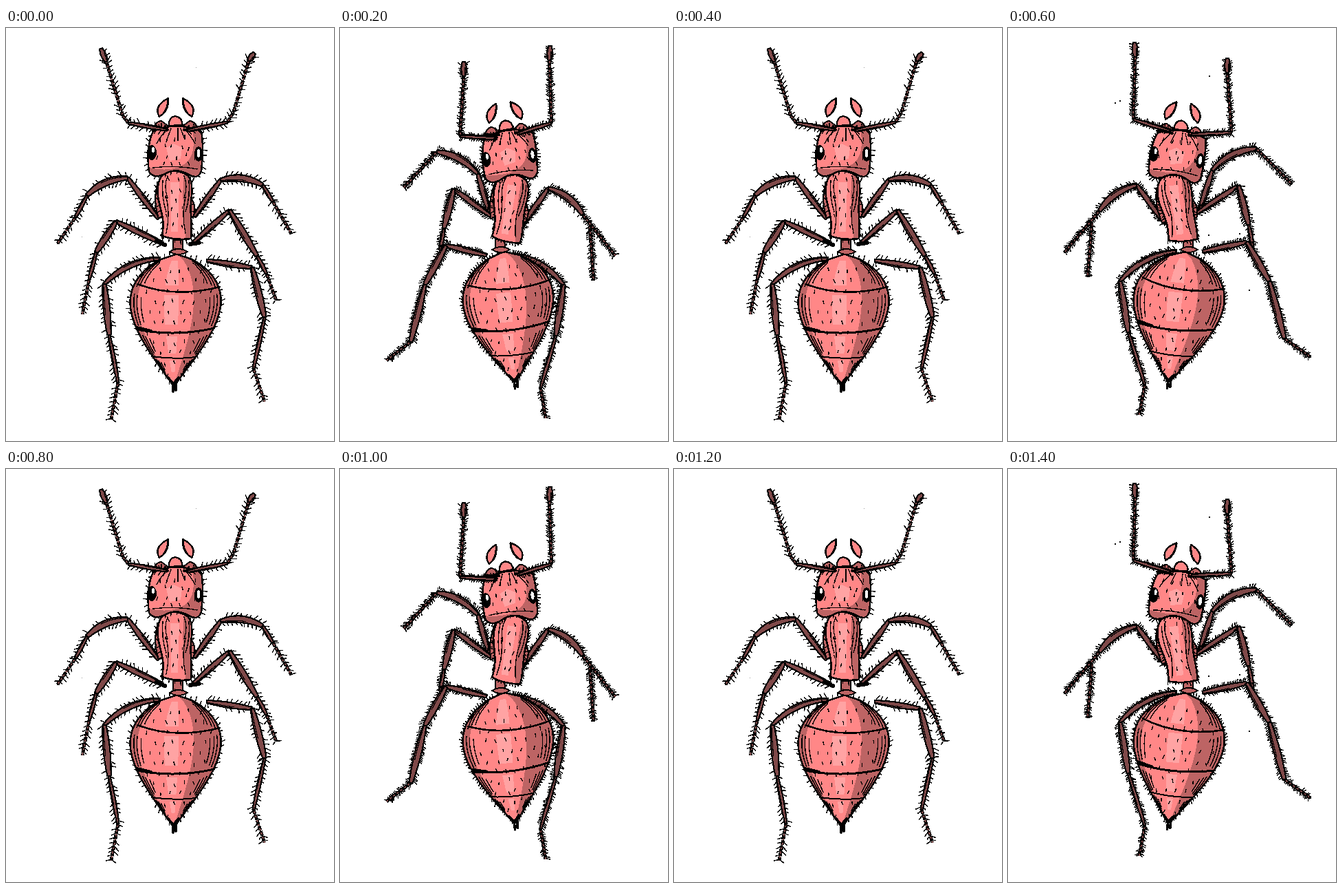
An HTML page that plays this animation: 477x600 px, repeating every 1.6 s.

```html
<!DOCTYPE html>
<html lang="en">
<head>
<meta charset="utf-8">
<title>Walking ant</title>
<style>
html, body { margin: 0; width: 100%; height: 100%; overflow: hidden; background: #fff; }
svg { display: block; width: 477px; height: 600px; }
</style>
</head>
<body>
<svg id="stage" viewBox="0 0 477 600" shape-rendering="crispEdges" stroke-linecap="round" stroke-linejoin="round"></svg>
<script>
const stage = document.getElementById('stage');
const INK = '#000', SKIN = '#ff8787', SHADE = '#bd6464', LIGHT = '#ffa3a3', LEG = '#804949';

function add(parent, tag, attrs) {
  const el = document.createElementNS('http://www.w3.org/2000/svg', tag);
  for (const key in attrs) el.setAttribute(key, attrs[key]);
  parent.appendChild(el);
  return el;
}

function path(parent, d, fill = 'none', stroke = INK, width = 2) {
  return add(parent, 'path', { d, fill, stroke, 'stroke-width': width });
}

function oval(parent, cx, cy, rx, ry, fill) {
  return add(parent, 'ellipse', { cx, cy, rx, ry, fill });
}

let seed = 1;
function rnd(lo = 0, hi = 1) {
  seed = (seed * 16807) % 2147483647;
  return lo + (hi - lo) * seed / 2147483647;
}

const spot = (x, y) => x.toFixed(1) + ',' + y.toFixed(1);
const hair = (x, y, dx, dy) => 'M' + spot(x, y) + 'l' + spot(dx, dy);
const poly = points => 'M' + points.join('L');

// Straight or upward-bowed stretch between two joints.
function stretch(ax, ay, bx, by, bow) {
  const length = Math.hypot(bx - ax, by - ay);
  const up = bx > ax ? 1 : -1;
  const cx = (ax + bx) / 2 + (by - ay) * up * bow * 2;
  const cy = (ay + by) / 2 - (bx - ax) * up * bow * 2;
  const at = t => {
    const u = 1 - t;
    const dx = u * (cx - ax) + t * (bx - cx), dy = u * (cy - ay) + t * (by - cy);
    const n = Math.hypot(dx, dy) || 1;
    return { x: u * u * ax + 2 * u * t * cx + t * t * bx,
             y: u * u * ay + 2 * u * t * cy + t * t * by, tx: dx / n, ty: dy / n };
  };
  return { at, length, d: `M${ax},${ay}Q${cx},${cy} ${bx},${by}` };
}

function bristles(g, c, half, rough) {
  let d = '';
  for (let s = 2; s < c.length; s += rough ? 2.8 : 6.5) {
    const p = c.at(s / c.length);
    for (const side of [-1, 1]) {
      if (rnd() < 0.2) continue;
      const len = rough ? rnd(1.5, 4.5) : rnd(3, 6), tilt = rnd(0.2, 0.9);
      const nx = -p.ty * side, ny = p.tx * side;
      d += hair(p.x + nx * half, p.y + ny * half, (nx + p.tx * tilt) * len, (ny + p.ty * tilt) * len);
    }
  }
  path(g, d, 'none', INK, 1.5);
}

function solid(g, c, half, rough) {
  const rim = k => Array.from({ length: 11 }, (_, i) => {
    const p = c.at(i / 10), w = k * half * (0.55 + 0.45 * Math.sin(Math.PI * i / 10));
    return spot(p.x - p.ty * w, p.y + p.tx * w);
  });
  path(g, poly(rim(1).concat(rim(-1).reverse())) + 'Z', LEG, INK, 2.2);
  path(g, poly(rim(0.5).slice(0, 7)), 'none', INK, 1.2);
  bristles(g, c, half, rough);
}

function beads(g, c, rough) {
  const line = path(g, c.d, 'none', INK, 5);
  const core = path(g, c.d, 'none', LEG, 2);
  for (const el of [line, core]) el.setAttribute('stroke-linecap', 'butt');
  if (!rough) line.setAttribute('stroke-dasharray', '7 1.2');
  path(g, c.d, 'none', INK, 2.4).setAttribute('stroke-dasharray', '1.5 5');
  bristles(g, c, 2, rough);
}

// Femur, tibia, slim, club and beaded stretches; a capital letter bows upward.
const HALF = { f: 4, t: 4.8, s: 2.7, c: 3.8, b: 0 };
const limb = (kinds, ...xy) => ({ kinds, xy });

function drawLimb(g, { kinds, xy }, rough) {
  [...kinds].forEach((kind, i) => {
    const key = kind.toLowerCase();
    const c = stretch(...xy.slice(i * 2, i * 2 + 4), kind === key ? 0 : 0.1);
    if (HALF[key]) solid(g, c, HALF[key], rough); else beads(g, c, rough);
  });
}

let clips = 0;
// Body part: outlined shape, clipped inner painting, fringe of hairs.
function shell(g, d, cx, cy, rough, paint) {
  const id = 'clip' + clips++;
  path(add(g, 'clipPath', { id }), d);
  path(g, d, SKIN, 'none');
  paint(add(g, 'g', { 'clip-path': `url(#${id})` }));
  const edge = path(g, d, 'none', INK, 2.6), total = edge.getTotalLength();
  let fringe = '';
  for (let s = 0; s < total; s += rough ? 4 : 8) {
    const p = edge.getPointAtLength(s), n = Math.hypot(p.x - cx, p.y - cy);
    const len = rough ? rnd(2, 5.5) : rnd(3, 7);
    fringe += hair(p.x, p.y, (p.x - cx) / n * len, (p.y - cy) / n * len + rnd(-3, 2));
  }
  path(g, fringe, 'none', INK, 1.5);
}

function ticks(g, x0, y0, x1, y1, gap) {
  let d = '', row = 0;
  for (let y = y0; y < y1; y += gap, row++)
    for (let x = x0 + (row % 2) * gap / 2; x < x1; x += gap)
      d += hair(x + rnd(-3, 3), y + rnd(-3, 3), rnd(-2, 2), rnd(3, 5));
  path(g, d, 'none', INK, 1.4);
}

// Draws once as given and once mirrored about a vertical axis.
function pair(g, axis, draw) {
  draw(g);
  draw(add(g, 'g', { transform: `translate(${axis * 2},0) scale(-1,1)` }));
}

function head(g, rough) {
  pair(g, 246.5, p => {
    path(p, 'M223,129Q214,113 236,102Q235,117 229,124Z', SKIN, INK, 2.4);
    path(p, 'M236,103Q236,116 229,124', 'none', INK, 3);
    path(p, 'M214,149Q216,136 226,135L238,144Z', SHADE, INK);
  });
  const d = 'M214,150C207,164 205,188 208,209Q215,219 229,213Q247,202 266,213Q279,221 284,208Q288,170 284,150Q246,135 214,150Z';
  shell(g, d, 246, 180, rough, c => {
    path(c, 'M270,140Q278,180 264,194Q246,211 208,203V220H290V140Z', SHADE, 'none');
    path(c, 'M233,174L244,168L256,174L254,190L238,193Z', LIGHT, 'none');
    ticks(c, 222, 158, 275, 206, 13);
    pair(c, 247, p => path(p, 'M236,145Q225,156 219,168M240,146L234,162', 'none', INK, 1.4));
    path(c, 'M250,146V163M214,203Q247,199 278,205', 'none', INK, 1.4);
  });
  path(g, 'M237,142Q236,130 246,128Q257,130 256,141Z', SKIN, INK, 2.2);
  pair(g, 247, p => path(p, 'M216,145L235,148', 'none', INK, 4));
  oval(g, 212, 181, 7, 11, INK);
  oval(g, 214, 177, 2, 4, '#fff');
  oval(g, 280, 183, 6, 11, INK);
  oval(g, 280, 182, 2.5, 6, '#fff');
}

function thorax(g, rough) {
  path(g, 'M221,224Q213,250 222,277L230,272ZM266,245Q279,255 272,276L264,272Z', SHADE, INK, 2.2);
  const d = 'M229,212Q219,221 221,244C223,262 232,275 227,302Q247,309 269,306C272,286 266,268 270,244Q272,221 264,214Q247,203 229,212Z';
  shell(g, d, 246, 258, rough, c => {
    path(c, 'M260,208Q254,238 262,310H280V208Z', SHADE, 'none');
    path(c, 'M239,224H252L250,296H240Z', LIGHT, 'none');
    ticks(c, 235, 220, 260, 298, 13);
    pair(c, 247, p => path(p, 'M228,222Q226,246 233,267M235,215Q229,230 235,247M233,246Q239,270 233,298', 'none', INK, 1.4));
  });
}

// Edge of the gaster: k runs from -1 (left rim) to 1 (right rim).
const TOP = 329, TALL = 189;
function rim(k, y0, y1) {
  const out = [];
  for (let i = 0; i <= 24; i++) {
    const y = y0 + (y1 - y0) * i / 24, s = (y - TOP) / TALL;
    const w = 64 * Math.sin(Math.PI * Math.pow(s, 0.68)) + 2;
    out.push(spot(248 - 4 * s + k * w, y));
  }
  return out;
}
const band = (k0, k1, y0, y1) => poly(rim(k0, y0, y1).concat(rim(k1, y1, y0))) + 'Z';

function gaster(g, rough) {
  const end = TOP + TALL;
  shell(g, band(-1, 1, TOP, end), 247, 420, rough, c => {
    path(c, band(0.4, 1.2, TOP, end), SHADE, 'none');
    path(c, band(-1.2, -0.84, TOP, end), SHADE, 'none');
    const rows = [[338, 374], [388, 431], [448, 473], [483, 500]];
    let d = '';
    for (const [y0, y1] of rows) {
      path(c, band(-0.25, 0.07, y0, y1), LIGHT, 'none');
      for (const k of [0.92, 0.85, 0.76])
        for (const side of [-1, 1]) {
          const cut = (1 - k) * 30;
          d += poly(rim(k * side, y0 - 4 + cut, y1 + 4 - cut));
        }
    }
    ticks(c, 207, 350, 298, 509, 15);
    path(c, d, 'none', INK, 1.4);
    path(c, 'M196,360Q204,343 222,335M186,434L211,440', 'none', INK, 4);
  });
  path(g, 'M191,372Q246,393 311,376', 'none', INK, 2.6);
  path(g, 'M190,438Q246,449 303,436', 'none', INK, 3);
  path(g, 'M212,477Q246,482 276,478', 'none', INK);
  path(g, 'M236,508L243,517L251,508M243,516V528M247,515V526', 'none', INK, 3.6);
}

const rest = {
  legs: [
    limb('fTsb', 222, 277, 177, 218, 118, 243, 101, 275, 75, 313),
    limb('fTsb', 274, 274, 312, 221, 373, 228, 388, 252, 415, 299),
    limb('ftsb', 228, 313, 160, 281, 131, 326, 121, 365, 111, 416),
    limb('ftsb', 271, 313, 325, 265, 365, 331, 379, 357, 393, 396),
    limb('Ftsb', 224, 335, 143, 372, 150, 446, 163, 515, 153, 569),
    limb('ftsb', 292, 338, 358, 348, 376, 420, 360, 495, 376, 543)
  ],
  feelers: [
    limb('sbbc', 234, 148, 178, 138, 170, 128, 146, 49, 138, 30),
    limb('sbbc', 264, 149, 322, 137, 331, 122, 353, 48, 361, 36)
  ],
  head: [0, 0, 0], thorax: [0, 0, 0], gaster: [0, 0, 0], waist: 250, rough: false,
  specks: [[276, 57], [110, 303]]
};

const right = {
  legs: [
    limb('b', 122, 282, 116, 362),
    limb('fTb', 229, 284, 187, 228, 133, 266, 82, 326),
    limb('Ftsb', 245, 324, 163, 368, 175, 442, 199, 518, 191, 562),
    limb('fTb', 279, 264, 297, 207, 361, 175, 413, 227),
    limb('fts', 275, 269, 335, 229, 350, 286, 356, 318),
    limb('fttb', 283, 325, 347, 311, 380, 368, 402, 451, 440, 478)
  ],
  feelers: [
    limb('sbc', 235, 149, 182, 133, 185, 42, 184, 21),
    limb('sbc', 267, 155, 325, 152, 319, 65, 319, 44)
  ],
  head: [0, 6, 6.8], thorax: [0, 4, -8], gaster: [-1, -4, 6], waist: 262, rough: true,
  specks: [[155, 108], [162, 105], [292, 69], [350, 380], [291, 300], [336, 298]]
};

const flip = x => 247 - (x - 247) * 0.93;
const flipLimb = ({ kinds, xy }) => ({ kinds, xy: xy.map((n, i) => i % 2 ? n + 5 : flip(n)) });
const flipTurn = ([dx, dy, turn]) => [-dx, dy, -turn];
const left = {
  legs: right.legs.map(flipLimb), feelers: right.feelers.map(flipLimb),
  head: flipTurn(right.head), thorax: flipTurn(right.thorax), gaster: flipTurn(right.gaster),
  waist: flip(right.waist), rough: true, specks: []
};

function build(pose) {
  seed = 4711;
  const root = add(stage, 'g', {}), { rough } = pose;
  const part = (name, cx, cy, draw) => {
    const [dx, dy, turn] = pose[name];
    draw(add(root, 'g', { transform: `translate(${dx},${dy}) rotate(${turn},${cx},${cy})` }), rough);
  };
  pose.legs.forEach(v => drawLimb(root, v, rough));
  if (!rough) path(root, 'M219,310L231,315M268,314L281,312', 'none', INK, 6);
  const x = pose.waist, y = rough ? 315 : 318;
  path(root, `M${x - 7},${y - 10}V${y + 8}H${x + 7}V${y - 10}Z`, SHADE, INK, 2.6);
  part('thorax', 247, 258, thorax);
  part('gaster', 246, 428, gaster);
  path(root, `M${x - 12},${y + 7}q13,-8 26,0q-13,8 -26,0Z`, SHADE, INK);
  part('head', 246, 180, head);
  pose.feelers.forEach(v => drawLimb(root, v, rough));
  const size = rough ? 2 : 1;
  for (const [sx, sy] of pose.specks)
    add(root, 'rect', { x: sx, y: sy, width: size, height: size, fill: rough ? INK : '#999' });
  return root;
}

const poses = [rest, left, right].map(build);
const steps = [0, 1, 0, 2];

function show(time) {
  const now = steps[Math.floor((time % 1600) / 200) % steps.length];
  poses.forEach((g, i) => g.setAttribute('display', i === now ? 'inline' : 'none'));
}

let start = null;
function tick(time) {
  if (start === null) start = time;
  show(time - start);
  requestAnimationFrame(tick);
}
show(0);
requestAnimationFrame(tick);
</script>
</body>
</html>
```
